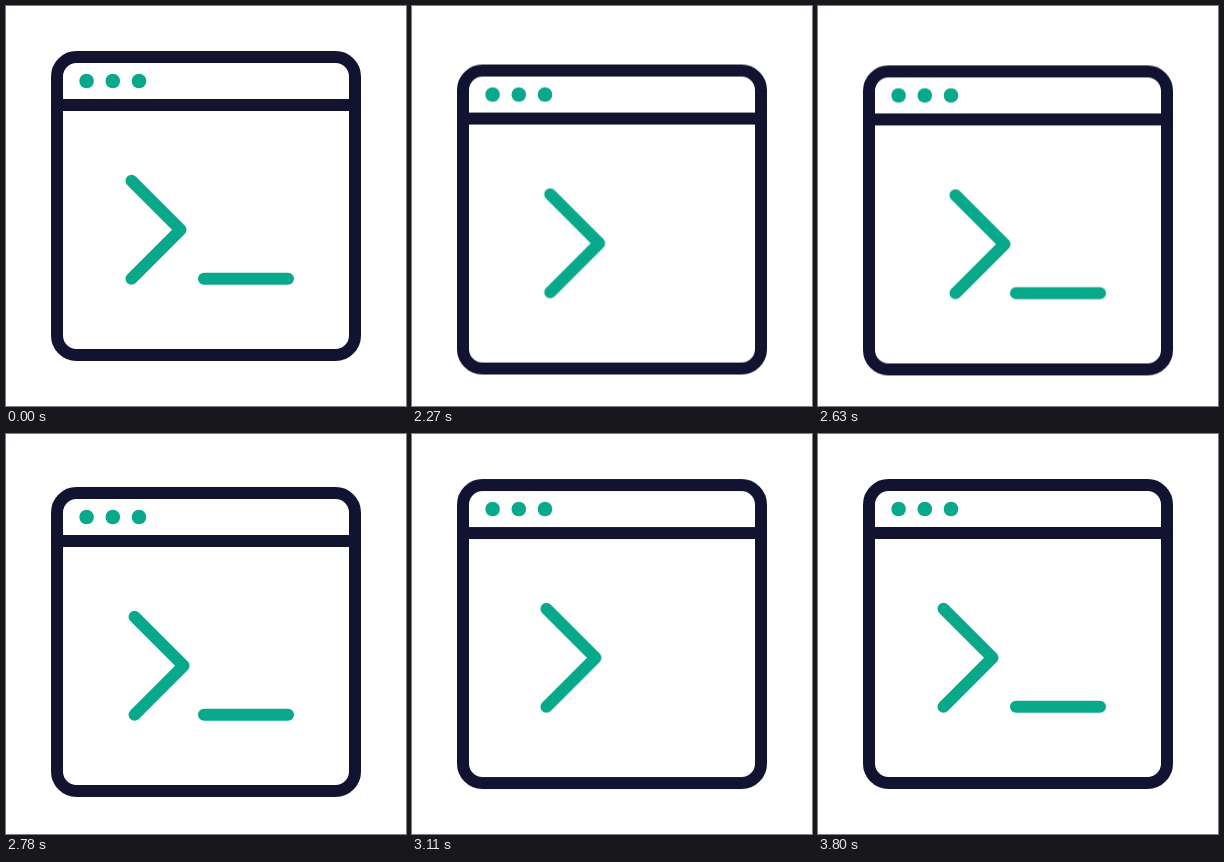
Animation of 400x400 px, one loop 3830 ms. Source, as an HTML page:

```html
<!DOCTYPE html>
<html lang="en">
<head>
<meta charset="utf-8">
<title>Terminal window</title>
<style>
  html, body { margin: 0; width: 100%; height: 100%; overflow: hidden; background: #fff; }
  svg { display: block; width: 100%; height: 100%; }

  .line { fill: none; stroke-width: 12; stroke-linecap: round; stroke-linejoin: round; }
  .dark { stroke: #121331; }
  .green { stroke: #08a88a; }
  .dots { fill: #08a88a; }

  .window, .prompt, .cursor { animation: 3830ms linear infinite; }
  .window { animation-name: dip; }
  .prompt { animation-name: nudge; }
  .cursor { animation-name: blink; animation-timing-function: step-end; }

  @keyframes dip {
    0% { transform: translateY(0); }
    52.22% { transform: translateY(0); animation-timing-function: cubic-bezier(.333, 0, .667, 1); }
    63.19% { transform: translateY(19px); animation-timing-function: cubic-bezier(.333, 0, .54, 1); }
    81.98%, 100% { transform: translateY(0); }
  }

  /* two pushes to the right, 900 ms each */
  @keyframes nudge {
    0% { transform: translateX(0); }
    52.09%, 75.59% { transform: translateX(0); animation-timing-function: cubic-bezier(.333, 0, .667, 1); }
    63.84%, 87.34% { transform: translateX(19px); animation-timing-function: cubic-bezier(.333, 0, .667, 1); }
    99.09%, 100% { transform: translateX(0); }
  }

  @keyframes blink {
    0%, 66.71%, 90.21%, 100% { opacity: 1; }
    56.79%, 80.29% { opacity: 0; }
  }
</style>
</head>
<body>
<svg viewBox="0 0 400 400">
  <g class="window">
    <rect class="line dark" x="51" y="51" width="298" height="298" rx="19.5"/>
    <path class="line dark" d="M51 99H349"/>
    <g class="dots">
      <circle cx="80.6" cy="75" r="7.3"/>
      <circle cx="106.8" cy="75" r="7.3"/>
      <circle cx="133" cy="75" r="7.3"/>
    </g>
    <path class="line green prompt" d="M125.5 174.8L174.5 223.8L125.5 272.8"/>
    <path class="line green cursor" d="M198 272.8H282"/>
  </g>
</svg>
</body>
</html>
```
